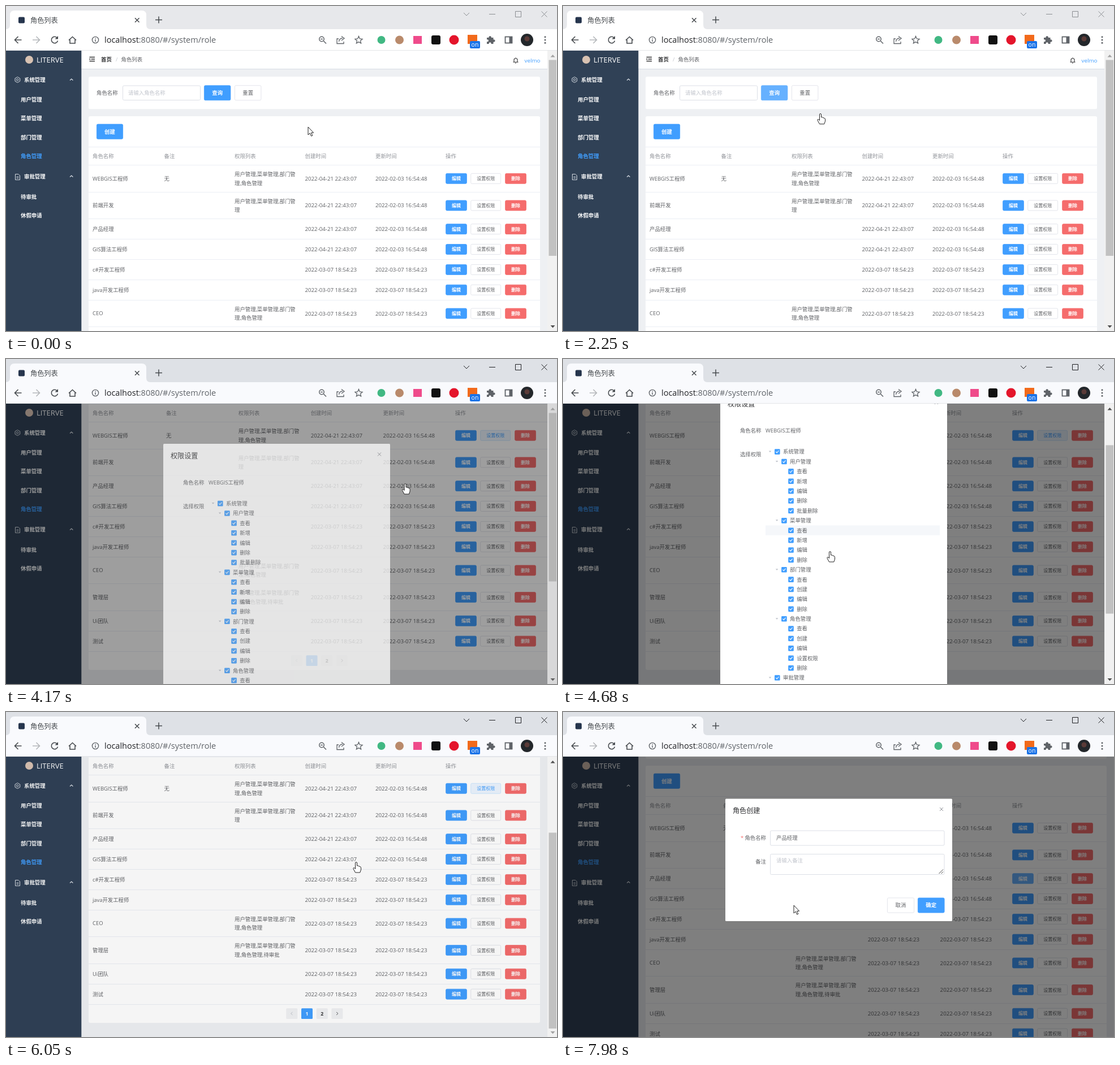
An HTML page that plays this animation: 974 px wide and 575 px high, repeating every 8 s.

```html
<!DOCTYPE html>
<html lang="zh-CN">
<head>
<meta charset="utf-8">
<title>角色列表</title>
<style>
html, body { margin: 0; width: 100%; height: 100%; overflow: hidden; background: #fff; }
svg { display: block; overflow: hidden; }
text { font-family: "Open Sans", "Noto Sans CJK SC", "Noto Sans CJK JP", "Noto Sans", sans-serif; white-space: pre; }
</style>
</head>
<body>
<svg id="stage" width="974" height="575" viewBox="0 0 974 575"></svg>
<script>
const BLUE = '#409eff', RED = '#f56c6c', GREY = '#606266', LINE = '#ebeef5', EDGE = '#dcdfe6';
const EM = 9.38;

// Drawing helpers; text is placed by its vertical centre.
const rect = (x, y, w, h, fill, more = '') =>
  `<rect x="${x}" y="${y}" width="${w}" height="${h}" fill="${fill}" ${more}/>`;
const circle = (x, y, r, fill, more = '') => `<circle cx="${x}" cy="${y}" r="${r}" fill="${fill}" ${more}/>`;
const path = (d, stroke, width = 1, more = '') =>
  `<path d="${d}" fill="none" stroke="${stroke}" stroke-width="${width}" ${more}/>`;
const text = (x, y, s, fill = GREY, size = EM, more = '') =>
  `<text x="${x}" y="${y + size * 0.37}" font-size="${size}" fill="${fill}" ${more}>${s}</text>`;
const group = (id, inner, more = '') => `<g id="${id}" ${more}>${inner}</g>`;
const MID = 'text-anchor="middle"', END = 'text-anchor="end"', STRONG = ' font-weight="600"';

function button(x, y, w, h, label, fill, size = EM, id = '') {
  const plain = fill === '#fff';
  const body = rect(x + .4, y + .4, w - .8, h - .8, fill, `rx="2" stroke-width=".8" stroke="${plain ? EDGE : fill}"`) +
    text(x + w / 2, y + h / 2, label, plain ? GREY : '#fff', size, MID + (plain ? '' : STRONG));
  return `<g ${id && `id="${id}"`}>${body}</g>`;
}
const field = (x, y, w, h) => rect(x + .5, y + .5, w - 1, h - 1, '#fff', `rx="2" stroke="${EDGE}"`);
const card = (id, x, y, w, h, inner) =>
  `<svg id="${id}" x="${x}" y="${y}" width="${w}" height="${h}">
    <rect width="100%" height="100%" rx="3" fill="#fff"/><g transform="translate(${-x},${-y})">${inner}</g></svg>`;

function browser() {
  const ink = '#5f6368', dark = '#45494d';
  const tab = '<path d="M0 41Q7 41 7 33V16Q7 8 15 8H240Q248 8 248 16V33Q248 41 255 41Z"/>';
  const nav =
    path('M27.500 60H16M21.500 54L15.500 60L21.500 66', dark, 1.6) +
    path('M47 60H59M53.500 54L59.500 60L53.500 66', '#b4b7ba', 1.6) +
    path('M90.500 56.500A5.700 5.700 0 1 0 91.500 61.500', dark, 1.6) +
    '<path d="M92 53V58.500H86.500Z" fill="#45494d"/>' +
    path('M111 60.500L117.500 54.500L124 60.500M113 59.500V66H122V59.500', dark, 1.6) +
    circle(158, 60, 5.6, 'none', `stroke="${ink}" stroke-width="1.400"`) +
    path('M158 59V63.200M158 56.500V58', ink, 1.4);
  const tools =
    circle(558, 58.5, 4.2, 'none', `stroke="${ink}" stroke-width="1.500"`) +
    path('M561.500 62L566 66.500M556 58.500H560', ink, 1.5) +
    path('M588 58H585V66.500H597V63M588.500 63Q589 57 595 57M593 53.500L598 57.200L593 61', ink, 1.3) +
    path('M623.500 53.500L625.400 58L630 58.400L626.500 61.500L627.600 66L623.500 63.600L619.400 66L620.500 61.500L617 58.400L621.600 58Z', ink, 1.3) +
    circle(663.5, 60, 7, '#41b883') + circle(695.5, 60, 7.5, '#b98a6b') +
    rect(720, 53, 15, 14, '#ef4b8b') + rect(752, 52, 16, 16, '#111', 'rx="3"') +
    circle(792, 60, 8.5, '#e4152b') + rect(816, 51, 17, 16, '#f26a1b') +
    rect(820, 62, 18, 13, '#1a73e8', 'rx="2"') + text(829, 68.3, 'on', '#fff', 10.5, MID) +
    `<path d="M850 56H853.500A2.200 2.200 0 1 1 857.800 56H861.500V59.500A2.200 2.200 0 1 1 861.500 63.500V67H857.500A2 2 0 1 0 853.800 67H850V63A2 2 0 1 0 850 59.500Z" fill="${ink}"/>` +
    rect(882.5, 54.5, 12, 11, 'none', `stroke="${ink}" stroke-width="1.800"`) + rect(889.5, 54, 5, 12, ink) +
    circle(921, 60, 11, '#23272b') + circle(921, 58, 4.5, '#5b3b38') +
    [54.8, 60, 65.2].map(y => circle(953, y, 1.5, ink)).join('');
  const win = path('M809 12L814 17L819 12M854 14.500H865M900.500 9.500H910.500V19.500H900.500ZM946.500 9.500L956.500 19.500M956.500 9.500L946.500 19.500', '#8b8e92', 1, 'id="win"');
  return rect(0, 0, 974, 42, '#e7e8eb', 'id="frame"') +
    group('bars', tab + '<rect y="41" width="974" height="38"/>', 'fill="#fff"') +
    rect(0, 78, 974, 1, '#e3e5e8') + rect(22, 19.5, 11, 11, '#26354d', 'rx="2"') +
    text(43, 25, '角色列表', '#45494d', 12.2) +
    path('M228 21.200L235.500 28.700M235.500 21.200L228 28.700M270 18.500V30.500M264 24.500H276', '#45494d', 1.5) +
    nav + text(174, 60, 'localhost<tspan fill="#5f6368">:8080/#/system/role</tspan>', '#202124', 14.5) + tools + win;
}

function sidebar() {
  const items = [['用户管理', 166], ['菜单管理', 199], ['部门管理', 233], ['角色管理', 266], ['待审批', 337.5], ['休假申请', 371]];
  return rect(0, 79, 133.3, 496, '#304156') + circle(41, 95, 7, '#d8c2b2') +
    text(54, 95, 'LITERVE', '#fff', 13) +
    text(32, 130.5, '系统管理', '#fff', EM, STRONG) + text(32, 301.5, '审批管理', '#fff', EM, STRONG) +
    items.map(([s, y]) => text(26, y, s, y === 266 ? BLUE : '#fff', EM, STRONG)).join('') +
    path('M20.300 125.500L24.700 128V133L20.300 135.500L16 133V128Z', '#d5dbe2') +
    circle(20.300, 130.500, 1.8, 'none', 'stroke="#d5dbe2"') +
    path('M16.500 297.500H22L24.500 300V307.500H16.500ZM18.500 302H22.500M18.500 304.500H22.500', '#d5dbe2') +
    path('M113 131.500L115.700 129L118.400 131.500M113 302.500L115.700 300L118.400 302.500', '#dfe4ea', 1.1);
}

// Name, creation time, update time, permission lines.
const T1 = '2022-04-21 22:43:07', T2 = '2022-02-03 16:54:48', T3 = '2022-03-07 18:54:23';
const P = '用户管理,菜单管理,部门管';
const ROWS = [
  ['WEBGIS工程师', T1, T2, [P, '理,角色管理']], ['前端开发', T1, T2, [P, '理']],
  ['产品经理', T1, T2], ['GIS算法工程师', T1, T2], ['c#开发工程师', T3, T3], ['java开发工程师', T3, T3],
  ['CEO', T3, T3, [P, '理,角色管理']], ['管理层', T3, T3, [P, '理,角色管理,待审批']],
  ['Ui团队', T3, T3], ['测试', T3, T3]
];
const COLS = [153, 279.5, 404, 528.5, 653, 777];
const tops = [281.5];
ROWS.forEach((r, i) => tops.push(tops[i] + (r[3] ? 47.6 : 35.87)));

function table() {
  const cols = ['角色名称', '备注', '权限列表', '创建时间', '更新时间', '操作']
    .map((s, i) => text(COLS[i], 265.5, s, '#909399'));
  let lines = rect(146, 249, 815, 1, LINE) + rect(146, 281, 815, 1, LINE);
  ROWS.forEach(([name, made, changed, perms], i) => {
    const y = (tops[i] + tops[i + 1]) / 2;
    lines += rect(146, Math.round(tops[i + 1] - .5), 815, 1, LINE);
    cols[0] += text(COLS[0], y, name);
    if (!i) cols[1] += text(COLS[1], y, '无');
    (perms || []).forEach((s, k) => cols[2] += text(COLS[2], y - 7.8 + 15.6 * k, s));
    cols[3] += text(COLS[3], y, made, GREY, 9.7);
    cols[4] += text(COLS[4], y, changed, GREY, 9.7);
    const by = y - 9.4;
    cols[5] += button(777.2, by, 37.6, 18.8, '编辑', BLUE, 8, 'edit' + i) +
      button(821.3, by, 53.7, 18.8, '设置权限', '#fff', 8, 'perm' + i) + button(882.2, by, 37.6, 18.8, '删除', RED, 8);
  });
  const pager = [495.3, 522, 548.7, 575.4].map((x, i) =>
    rect(x, 694.2, 20, 18.7, i === 1 ? BLUE : '#f0f1f3', 'rx="1.500"')).join('') +
    path('M506.500 701L503.500 703.500L506.500 706', '#c0c4cc') + path('M584 701L587 703.500L584 706', GREY) +
    text(532, 703.5, '1', '#fff', 8.7, MID + ' font-weight="700"') +
    text(558.7, 703.5, '2', '#303133', 8.7, MID + ' font-weight="700"');
  return rect(146, 0, 815, 0, '#f5f7fa', 'id="hover"') + lines + button(160, 208.7, 47, 27, '创建', BLUE) +
    cols.map((c, i) => group('col' + i, c)).join('') + group('pager', pager);
}

function page() {
  const header = rect(133, 79, 841, 32, '#fff') + rect(133, 111, 841, 1, '#d8dce5') +
    path('M147.500 90.500H157M150.500 94H157M147.500 97.500H157', '#303133', 1.3) +
    '<path d="M147.500 92.200V95.800L149.600 94Z" fill="#303133"/>' +
    text(168, 94.5, '首页', '#303133', EM, 'font-weight="700"') + text(194, 94.5, '/', '#c0c4cc') +
    text(203.5, 94.5, '角色列表') +
    group('user', path('M896.500 99.300H905.500M898 99V95.500A3 3 0 0 1 904 95.500V99M900 101H902M901 91.500V92.500', '#303133', 1.1) +
      text(916.5, 96, 'velmo', BLUE, 9.8));
  const search = text(160, 154, '角色名称') + field(206, 140.5, 138, 26.5) + text(216, 154, '请输入角色名称', '#c0c4cc') +
    button(350, 140.3, 47.3, 26.8, '查询', BLUE, EM, 'query') + button(404, 140.3, 47.3, 26.8, '重置', '#fff');
  return rect(133, 79, 841, 700, '#eef0f3') + header +
    card('search', 146, 125, 798, 57.5, search) + card('list', 146, 195, 798, 525, table());
}

const scrollbar = (id) => group(id, rect(957, 79, 17, 496, '#f1f1f1') +
  rect(959.5, 96, 13.5, 346, '#c1c1c1', `id="${id}Thumb"`) +
  `<path id="${id}Up" d="M962.500 90.500L966.500 86L970.500 90.500Z" fill="#505050"/>
   <path id="${id}Down" d="M962.500 565L966.500 569.500L970.500 565Z" fill="#505050"/>`);

function dialog(id, x, h, title, inner) {
  const r = x + 401, b = 153 + h;
  return group(id, rect(x, 153.5, 401, h, '#fff', 'rx="1.500"') + text(x + 13, 175, title, '#303133', 12.1) +
    path(`M${r - 22} 169l6 6m0-6l-6 6`, '#909399', 1) + inner +
    button(r - 115, b - 41, 48, 27, '取消', '#fff') + button(r - 61, b - 41, 47.5, 27, '确定', BLUE));
}

function tree() {
  const kids = { 用户管理: '查看 新增 编辑 删除 批量删除', 菜单管理: '查看 新增 编辑 删除', 部门管理: '查看 创建 编辑 删除', 角色管理: '查看 创建 编辑 设置权限 删除' };
  const nodes = [[0, '系统管理']];
  for (const k in kids) nodes.push([1, k], ...kids[k].split(' ').map(s => [2, s]));
  nodes.push([0, '审批管理'], [1, '待审批'], [1, '休假申请'], [2, '新增']);
  return nodes.map(([level, s], i) => {
    const x = 374 + 12.1 * level, y = 259 + 17.39 * i;
    return (i === 8 ? rect(358, y - 8.7, 308, 17.4, '#f5f7fa', 'id="treeHover"') : '') +
      (level < 2 ? `<path d="M${x - 10.300} ${y - 1.500}h4.600l-2.300 2.800z" fill="#c0c4cc"/>` : '') +
      rect(x, y - 4.7, 9.6, 9.6, BLUE, 'rx="1.300"') +
      path(`M${x + 2.300} ${y}l1.900 2l3.200-4`, '#fff', 1.1) + text(x + 15, y, s);
  }).join('');
}

const grant = () => dialog('grant', 278, 649, '权限设置',
  text(350.5, 222, '角色名称', GREY, EM, END) + text(358, 222, 'WEBGIS工程师') +
  text(350.5, 264, '选择权限', GREY, EM, END) + tree());
const form = () => dialog('form', 287, 216.5, '角色创建',
  text(359, 223, '<tspan fill="#f56c6c">* </tspan>角色名称', GREY, EM, END) + field(366, 209.5, 308.5, 27) + text(377, 223, '产品经理') +
  text(359, 264.5, '备注', GREY, EM, END) + field(366, 251, 308.5, 37) + text(377, 262.5, '请输入备注', '#c0c4cc') +
  path('M664.500 286L672 278.500M668.500 286L672 282.500', '#444', 1));

const cursors = `<path id="arrow" d="M0 0V14L3.200 11L5.600 16.200L7.800 15.200L5.500 10.200H9.600Z" fill="#fff" stroke="#222" stroke-linejoin="round"/>
  <path id="hand" d="M-1.500 1Q-1.500 -.3 0 -.3T1.500 1V6Q4.200 5.200 4.500 7Q6.600 6.300 7 8Q8.500 7.800 8.500 9.500V13L6.800 18H-1.500L-5 11.500Q-5.500 9.300 -3.500 9.600L-1.500 11.500Z" fill="#fff" stroke="#222" stroke-linejoin="round"/>`;

const stage = document.getElementById('stage');
stage.innerHTML = `<svg x="133" y="79" width="841" height="496"><g id="page">${page()}</g></svg>` + sidebar() +
  scrollbar('bar') + rect(0, 79, 974, 496, '#000', 'id="shade"') +
  `<svg x="0" y="79" width="974" height="496"><g transform="translate(0,-79)">${grant() + form()}</g></svg>` +
  scrollbar('dbar') + browser() + group('cursor', cursors);

const el = {};
stage.querySelectorAll('[id]').forEach(n => el[n.id] = n);
const set = (id, props) => { for (const k in props) el[id].setAttribute(k, props[k]); };
const show = (id, on) => set(id, { display: on ? 'inline' : 'none' });
const move = (id, x, y) => set(id, { transform: `translate(${x},${y})` });

const LOOP = 8000;
const SCROLL = [[0, 0], [150, 70], [270, 140], [390, 168], [540, 150], [660, 90], [810, 20], [930, 0], [1080, 109], [1200, 165],
  [1350, 70], [1500, 0], [2520, 0], [2640, 160], [2880, 168], [3150, 170], [6200, 170], [6680, 103], [6830, 100]];
const DSCROLL = [[4410, 0], [4530, 56], [4680, 95], [4920, 160], [5060, 190], [5300, 277]];
const SHADE = [[4000, 0], [4050, .12], [4170, .38], [4290, .5], [5690, .5], [5810, .42], [5930, .18], [6050, .04], [6170, 0],
  [7640, 0], [7740, .14], [7860, .4], [7980, .5]];
const POINTER = [[0, 534, 214], [1080, 559, 274], [1500, 836, 332], [1650, 830, 330], [2370, 380, 163], [2490, 379, 166],
  [3150, 862, 228], [3300, 861, 225], [3540, 856, 141], [3930, 856, 141], [4530, 480, 341], [4680, 472, 341],
  [5300, 640, 492], [5660, 642, 494], [6050, 619, 266], [6200, 619, 266], [6680, 790, 308], [6830, 796, 302],
  [7100, 850, 296], [7340, 848, 295], [7460, 800, 296], [7740, 790, 298], [7980, 408, 342]];
const RUNS = [0, 150, 540, 810, 1080, 1350, 1500, 1650, 2640, 3030, 3300, 3930, 4680, 5060, 5810, 6200, 6830, 7340, 7740, 8130];

function at(keys, t, k = 1) {
  const i = keys.findIndex(p => p[0] > t);
  if (i < 0) return keys[keys.length - 1][k];
  if (!i) return keys[0][k];
  const a = keys[i - 1], b = keys[i];
  return a[k] + (b[k] - a[k]) * (t - a[0]) / (b[0] - a[0]);
}
const within = (t, ...spans) => spans.some(([a, b]) => t >= a && t < b);

// The screen refreshes every 120 ms inside each run and rests at its end.
function snap(t) {
  const i = RUNS.findIndex(s => s > t), start = RUNS[i - 1];
  const count = Math.max(1, Math.floor((RUNS[i] - start) / 120));
  return start + 120 * Math.min(count - 1, Math.floor((t - start) / 120));
}

function scrollTo(id, off, ratio, size, max) {
  set(id + 'Thumb', { y: 95.5 + off * ratio, height: size });
  set(id + 'Up', { fill: off < .5 ? '#a3a3a3' : '#505050' });
  set(id + 'Down', { fill: off > max - .5 ? '#a3a3a3' : '#505050' });
}

function paint(id, fill, stroke, ink) {
  const [box, label] = el[id].children;
  box.setAttribute('fill', fill);
  box.setAttribute('stroke', stroke);
  label.setAttribute('fill', ink);
}

function render(now) {
  const t = snap(now);
  const off = Math.round(at(SCROLL, t)), doff = Math.round(at(DSCROLL, t)), shade = at(SHADE, t);
  const x = at(POINTER, t, 1), y = at(POINTER, t, 2);
  const granting = within(t, [4040, 5990]), forming = t >= 7700;
  const wide = granting || forming ? 17 : 0;

  move('page', -133, -79 - off);
  set('search', { width: 798 + wide });
  set('list', { width: 798 + wide });
  COLS.forEach((_, i) => move('col' + i, wide * i / 5, 0));
  move('pager', wide / 2, 0);
  move('user', wide, 0);
  show('bar', !wide);
  scrollTo('bar', off, .694, 346.5, 170);

  const row = tops.findIndex(v => v > y + off) - 1;
  const hot = row >= 0 && within(t, [1650, 1950], [3300, 3930]);
  set('hover', hot ? { y: tops[row], height: tops[row + 1] - tops[row] } : { height: 0 });
  const light = '#66b1ff';
  const onQuery = within(t, [2240, 2600]), onEdit = t >= 7340;
  paint('query', onQuery ? light : BLUE, onQuery ? light : BLUE, '#fff');
  paint('edit2', onEdit ? light : BLUE, onEdit ? light : BLUE, '#fff');
  if (within(t, [3420, 7600])) paint('perm0', '#ecf5ff', '#c6e2ff', BLUE);
  else paint('perm0', '#fff', EDGE, GREY);

  set('shade', { opacity: shade, width: wide ? 974 : 957 });
  const solid = Math.max(0, (shade - .05) / .45);
  show('grant', granting);
  show('dbar', granting);
  show('form', forming);
  set('grant', { opacity: solid });
  set('form', { opacity: solid });
  set('dbar', { opacity: solid });
  move('grant', 0, -doff - 13 * (1 - solid));
  move('form', 0, -13 * (1 - solid));
  scrollTo('dbar', doff, .6, 298, 277);
  show('treeHover', within(t, [4500, 4790]));

  const active = t >= 3930;
  set('frame', { fill: active ? '#dee1e6' : '#e7e8eb' });
  set('bars', { fill: active ? '#f9fafd' : '#fff' });
  set('win', { stroke: active ? '#202124' : '#8b8e92' });

  const hand = within(t, [2240, 2600], [3420, 6190], [6800, 6940], [7300, 7850]);
  show('hand', hand);
  show('arrow', !hand);
  move('cursor', x, y);
}

function tick() {
  render(performance.now() % LOOP);
  requestAnimationFrame(tick);
}
tick();
</script>
</body>
</html>
```
